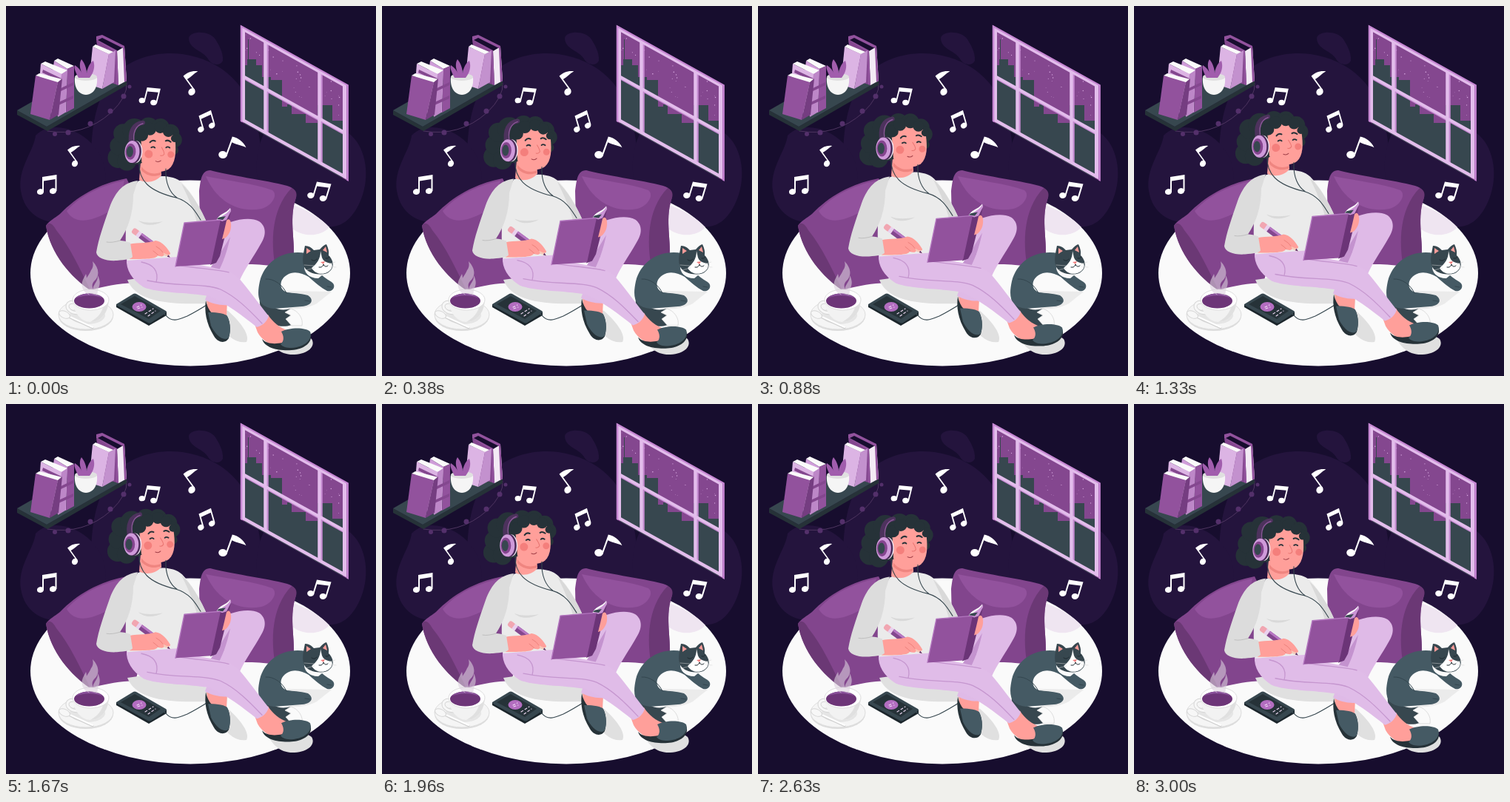
An HTML page that plays this animation: 500 px wide and 500 px high, repeating every 3040 ms.

```html
<!DOCTYPE html>
<html lang="en">
<head>
<meta charset="utf-8">
<title>Reading with music</title>
<style>
html, body { margin: 0; width: 100%; height: 100%; overflow: hidden; background: #170d2e; }
svg { display: block; width: 100vw; height: 100vh; }
.line { fill: none; stroke-linecap: round; stroke-linejoin: round; }
</style>
</head>
<body>
<svg viewBox="0 0 500 500">
<defs>
  <g id="pair" fill="#fff">
    <ellipse cx="-9" cy="9" rx="4.6" ry="4" transform="rotate(-15 -9 9)"/>
    <ellipse cx="8" cy="8" rx="4.6" ry="4" transform="rotate(-15 8 8)"/>
    <path d="M-6.500 9V-11L13-14V8H11V-8L-4.500-5.500V9Z"/>
  </g>
  <g id="single" fill="#fff">
    <ellipse rx="5.500" ry="4.800" transform="rotate(-15)"/>
    <path d="M3.500 0V-26C11-27 19-25 25-19C18-20 12-18 5.500-19V0Z"/>
  </g>
  <clipPath id="pane"><path d="M317 26L463 107V237L317 156Z"/></clipPath>
</defs>

<!-- backdrop -->
<rect width="500" height="500" fill="#170d2e"/>
<g fill="#24143d">
  <path d="M118 250C110 180 118 122 150 90C190 55 250 58 290 84C325 108 350 150 345 250Z"/>
  <path d="M20 250C15 220 38 195 40 175C60 155 95 165 115 185C135 205 140 235 130 262C110 300 30 310 20 250Z"/>
  <path d="M340 235C335 200 345 165 368 150C410 130 450 155 463 172C485 188 492 225 482 255C472 285 455 300 435 298C390 280 350 270 340 235Z"/>
  <path d="M247 43C250 33 275 33 283 45C287 52 294 62 293 74C289 82 277 80 272 70C265 60 247 58 247 43Z"/>
</g>

<!-- shelf -->
<path class="line" d="M56 169Q105 177 142 144Q165 122 163 104" stroke="#4e3560"/>
<g fill="#54306b">
  <circle cx="66" cy="173" r="3"/><circle cx="84" cy="171" r="3.500"/><circle cx="114" cy="159" r="3.500"/>
  <circle cx="141" cy="142" r="3.500"/><circle cx="159" cy="122" r="3.500"/><circle cx="167" cy="109" r="2.500"/>
</g>
<path d="M15 141L55 163L163 101V107L56 169L15 147Z" fill="#263238"/>
<path d="M15 141L123 79L163 101L55 163Z" fill="#37474f"/>
<path d="M122 46L150 61L152 107L130 100Z" fill="#84478f"/>
<path d="M150 61L160 55L163 101L152 107Z" fill="#f3eaf5"/>
<path d="M122 46V41L130 39L160 54L163 101L160 103L158 57L130 43L124 46L150 60L152 107L149 106L148 62Z" fill="#92529d"/>
<path d="M117 55L139 65L130 112L112 106Z" fill="#dcb4e4"/>
<path d="M139 65L148 60L146 103L130 112Z" fill="#c391ce"/>
<path d="M117 55L121 52L145 62L139 65Z" fill="#fafafa"/>
<path d="M93 97C92 108 96 119 108 120C120 119 124 108 123 97Z" fill="#f5f5f5"/>
<ellipse cx="108" cy="96" rx="15" ry="5" fill="#e0e0e0"/>
<path d="M98 97C95 91 91 84 93 80C98 83 101 87 103 92C99 84 99 76 102 72C106 77 109 84 109 91C110 83 114 76 118 74C121 82 118 91 113 97Z" fill="#a15dad"/>
<path d="M65 74L70 71L92 81L83 85Z" fill="#fafafa"/>
<path d="M65 74L83 85L81 144L58 132Z" fill="#cf9dd9"/>
<path d="M83 85L92 81V138L81 144Z" fill="#92529d"/>
<path d="M47 78L53 75L83 87L75 92Z" fill="#fafafa"/>
<path d="M47 78L75 92L72 149L42 138Z" fill="#dcb4e4"/>
<path d="M75 92L83 87L80 144L70 150Z" fill="#bd87c8"/>
<path d="M50 86L75 98V102L49 90ZM72 112L91 103V107L72 116ZM71 130L91 121V125L71 134Z" fill="#84478f"/>
<path d="M40 94L45 91L76 99L69 104Z" fill="#fafafa"/>
<path d="M40 94L70 103L59 154L33 146Z" fill="#92529d"/>
<path d="M70 103L76 98L71 147L59 154Z" fill="#753d81"/>

<!-- window -->
<g clip-path="url(#pane)">
  <rect x="317" y="26" width="146" height="211" fill="#84478f"/>
  <path d="M322 240V80H326V72H327V45H328V72H338V80H346V96H358V100H373V136H380V133H386V146H405V158H421V134H441V155H455V240Z" fill="#37474f"/>
  <g id="stars" fill="#d9aae2"/>
</g>
<g transform="translate(317 26) skewY(29)" fill="none">
  <path d="M36.500 5V125M109.500 5V125M5 69.500H141" stroke="#c68bd2" stroke-width="2.500"/>
  <path d="M33.500 4V126M106.500 4V126M4 67H142" stroke="#e3bdec" stroke-width="4.500"/>
  <rect x="3.500" y="3.500" width="137" height="123" stroke="#e3bdec" stroke-width="5"/>
  <path d="M1 130V1H144.500V130" stroke="#c687d3" stroke-width="2.500"/>
</g>

<!-- notes -->
<use href="#pair" transform="translate(194 121.500) rotate(14) scale(.93)"/>
<use href="#pair" transform="translate(269 156.500) rotate(-16) scale(.92)"/>
<use href="#pair" transform="translate(55.500 242)"/>
<use href="#pair" transform="translate(423 250) rotate(17)"/>
<use href="#single" transform="translate(293 201) rotate(20) scale(1.05)"/>
<use href="#single" transform="translate(251 116) rotate(-36) scale(.92)"/>
<use href="#single" transform="translate(93 213) rotate(-36) scale(.8)"/>

<!-- round mat and cushions -->
<ellipse cx="249" cy="361" rx="216" ry="125.500" fill="#fafafa"/>
<path d="M385 268L386 300C402 314 427 311 437 299C424 285 405 275 385 268Z" fill="#efe5f1"/>
<path d="M54 297C58 290 66 287 73 281C95 258 125 240 163 233L195 300L175 374C150 375 132 379 114 384C88 366 60 335 54 297Z" fill="#82458d"/>
<path d="M82 277C100 256 130 242 160 236L152 270C125 288 95 300 82 277Z" fill="#92529d"/>
<path d="M54 297C57 291 63 293 68 303C88 328 98 352 114 384C88 367 60 335 54 297Z" fill="#6b3875"/>
<path d="M261 250C263 238 263 222 276 222C300 229 350 235 380 243C390 246 394 252 391 262C382 290 392 320 388 345C385 354 375 354 365 352C340 348 325 349 300 349L262 290Z" fill="#82458d"/>
<path d="M270 230C300 236 335 240 360 249C368 255 360 270 345 274C315 280 285 265 270 230Z" fill="#92529d"/>
<path d="M386 246C393 249 394 255 391 262C382 290 392 320 388 345C385 354 375 354 364 352C358 320 358 275 386 246Z" fill="#6b3875"/>

<!-- floor shadows -->
<g fill="#e0e0e0">
  <path d="M164 370C175 398 215 404 270 402L300 412C318 428 330 445 325 454C312 456 302 448 294 438L300 390L200 365Z"/>
  <path d="M350 440C358 460 370 472 390 471C408 470 419 460 413 450C400 440 375 440 350 440Z"/>
  <path d="M365 405C385 412 405 410 420 402L440 386L380 385Z" fill="#ebebeb"/>
</g>

<!-- coffee -->
<ellipse cx="108" cy="419" rx="37" ry="20" fill="#dcdcdc"/>
<ellipse cx="108" cy="417" rx="37" ry="20" fill="#f5f5f5" stroke="#dedede"/>
<ellipse cx="110" cy="418" rx="24" ry="12" fill="#e5e5e5"/>
<path class="line" d="M93 401C80 397 78 414 97 415" stroke="#d5d5d5" stroke-width="5"/>
<path class="line" d="M93 401C80 397 78 414 97 415" stroke="#f7f7f7" stroke-width="3"/>
<path d="M90 397C91 415 102 427 114 427C128 427 138 415 139 397Z" fill="#f2f2f2"/>
<path d="M139 397C138 415 128 427 114 427C126 420 131 412 132 402Z" fill="#e0e0e0"/>
<ellipse cx="114.500" cy="397" rx="24.500" ry="14" fill="#fff" stroke="#dedede"/>
<ellipse cx="112.500" cy="398.500" rx="20.500" ry="10" fill="#6d3578"/>
<path d="M94 395C103 386 122 386 131 395C121 390 104 390 94 395Z" fill="#89509a"/>
<path class="line" d="M82 419L117 435" stroke="#d0d0d0" stroke-width="3"/>
<path class="line" d="M82 418L117 434" stroke="#fff" stroke-width="2"/>
<ellipse cx="79" cy="417" rx="8" ry="4.500" transform="rotate(25 79 417)" fill="#f7f7f7" stroke="#d5d5d5"/>
<g fill="#ddd2df" opacity=".58">
  <path d="M111 388C98 376 112 366 115 357C118 353 118 349 117 345C126 354 127 365 119 372C114 378 118 382 120 390Z"/>
  <path d="M107 387C98 376 105 369 108 362C111 371 105 377 113 391Z"/>
  <path d="M119 390C113 378 125 374 124 364C131 378 122 381 124 391Z"/>
</g>

<!-- phone -->
<path d="M149 403V407L193 432L217 418V413Z" fill="#1b252b"/>
<path d="M149 403L172 389Q174 388 176 389L216 412Q218 414 216 415L196 428Q194 429 192 428L150 405Z" fill="#37474f"/>
<path d="M155 403L174 392L209 412L193 423Z" fill="#263238"/>
<ellipse cx="180" cy="406.500" rx="9.500" ry="6.500" fill="#b36dc0"/>
<path class="line" d="M177 407L183 404M178 409L184 407M188 416L199 409M192 419L202 412" stroke="#f2dcf6" stroke-width="1.100" stroke-dasharray="3 3"/>
<path class="line" d="M211 414L216 418C224 428 233 424 245 419C257 413 265 408 276 401" stroke="#37474f" stroke-width="1.200"/>

<!-- cat -->
<path d="M343 392C340 420 362 439 386 431L378 423L385 418L377 414L385 409C370 413 358 408 352 398Z" fill="#37474f"/>
<path d="M385 409C395 412 402 422 400 432L386 432L378 423L385 418L377 414Z" fill="#fafafa" stroke="#d0d0d0" stroke-width=".7"/>
<path d="M405 334C375 329 350 345 343 372C338 395 342 407 362 409L400 406C413 405 417 397 408 391C396 388 388 388 380 387C367 383 369 366 385 361C394 359 402 362 409 366C418 374 426 381 434 385C442 387 447 378 440 373C432 368 426 364 422 359Z" fill="#455a64"/>
<path class="line" d="M351 369C362 368 374 377 379 388M404 398L411 399M434 379L440 380" stroke="#34464f"/>
<path d="M403 350C402 360 409 368 422 368L432 360Z" fill="#fafafa"/>
<path d="M404 324Q411 324 416 330L424 329Q429 323 433 322Q437 330 436 337C444 345 444 356 434 361C422 365 405 361 402 350C400 342 402 334 404 324Z" fill="#37474f"/>
<path d="M406 327L412 331L406 335ZM432 325L434 333L428 330Z" fill="#f59b98"/>
<path d="M425 331C425 342 420 348 413 354C418 363 428 363 434 360C440 357 442 351 440 348C433 347 429 345 427 340Z" fill="#fff"/>
<path d="M425 346L431 345L429 349Z" fill="#f08080"/>
<path class="line" d="M413 343Q417 346 420 342M432 341Q435 342 437 339M423 353Q428 354 429 349Q431 354 435 351" stroke="#1f2a30"/>
<path class="line" d="M416 351L403 350M417 354L405 357M436 349L445 346M437 352L446 353" stroke="#d5d5d5" stroke-width=".5"/>

<!-- reader -->
<g id="reader">
  <path d="M271 394L299 397L298 421C288 425 278 421 272 412Z" fill="#ff9f9a"/>
  <path d="M270 398C268 412 270 428 281 446C287 456 297 456 301 449C304 437 303 425 298 418C288 424 274 418 270 398Z" fill="#263238"/>
  <path d="M273 414C281 414 293 414 299 419C304 430 304 443 300 449C292 453 282 443 277 432Z" fill="#455a64"/>
  <path d="M336 430L354 417C360 427 370 435 382 439L378 460C360 462 346 452 340 441Z" fill="#ff9f9a"/>
  <path d="M346 450C352 457 364 457 373 455L411 442C416 454 403 464 386 465C369 466 350 463 346 450Z" fill="#263238"/>
  <path d="M372 440C383 434 405 434 411 440C415 451 403 461 386 462C379 462 374 461 371 457C377 452 375 445 372 440Z" fill="#455a64"/>

  <path d="M280 302C300 291 327 283 342 291C352 298 352 310 344 322C335 338 325 352 318 366L300 404C290 405 277 402 269 397C275 380 285 360 295 340L240 350Z" fill="#dfbae7"/>
  <path d="M303 312C300 326 296 341 288 357L276 354L292 330Z" fill="#c493cf"/>
  <path d="M163 342C162 356 170 370 186 380C205 388 245 387 275 392C300 403 320 419 339 434C347 432 353 426 355 419C340 400 327 382 314 367C300 354 270 353 240 345L238 330L170 330Z" fill="#e0bce8"/>
  <path class="line" d="M183 346C199 349 207 358 203 373M191 371C235 380 266 374 290 383C311 393 328 410 346 429M237 351C264 355 285 356 301 360" stroke="#c596cf" stroke-width="1.300"/>

  <path d="M178 237C195 229 225 226 238 239C252 253 264 276 272 294L232 339C208 341 185 342 164 344C160 320 162 290 165 260Z" fill="#ebebeb"/>
  <path d="M179 290C187 298 202 297 212 291C202 293 189 294 179 290ZM237 240C245 256 255 278 258 293L272 294C264 275 251 252 237 240Z" fill="#d9d9d9"/>
  <path d="M182 210L180 235C189 240 203 238 210 229L209 212Z" fill="#ff9f9a"/>
  <path d="M183 217C191 227 200 228 209 225V228C199 232 189 229 183 222Z" fill="#ef8580"/>

  <!-- book -->
  <path d="M284 290C288 280 297 281 303 273L304 277L297 291Z" fill="#fafafa"/>
  <path d="M289 290L298 287L304 276L302 287L289 338L284 347L276 350Z" fill="#6b3477"/>
  <path d="M241 293L290 289L277 349L229 352Z" fill="#92529d"/>
  <path d="M288 289C291 282 299 282 303 274L304 277L298 289L292 291Z" fill="#c993d4"/>
  <path d="M285 288C288 284 294 285 297 284L293 289Z" fill="#37474f"/>
  <path class="line" d="M241 293L229 352M241 293L289 289" stroke="#b376bf" stroke-width="1.400"/>
  <path d="M298 290C303 284 306 295 303 304C300 311 297 314 292 315L295 303Z" fill="#ff9f9a"/>

  <!-- writing arm -->
  <g transform="translate(172 303) rotate(36.500)">
    <rect x="-1" y="-4" width="10" height="8" rx="3" fill="#f1a6b1"/>
    <rect x="7" y="-4" width="5" height="8" fill="#ead1ee"/>
    <rect x="12" y="-4" width="38" height="8" fill="#84478f"/>
    <rect x="12" y="-4" width="38" height="3" fill="#b777c3"/>
    <path d="M50-4L62 0L50 4Z" fill="#f5cbb9"/>
    <path d="M58-1.500L62 0L58 1.500Z" fill="#5d2c68"/>
  </g>
  <path d="M166 322C180 319 193 321 202 317C211 318 218 327 222 334C222 338 217 336 212 333C216 338 211 340 205 337C204 342 188 342 167 342Z" fill="#ff9f9a"/>
  <path class="line" d="M203 325Q209 328 212 333M199 331Q203 334 206 337" stroke="#e87974" stroke-width=".8"/>
  <path d="M178 236C160 238 148 250 140 272C132 295 125 315 122 333C123 341 136 345 150 344C162 343 169 342 171 339L168 320C163 318 158 317 154 317C165 301 172 280 172 255Z" fill="#dcdcdc"/>
  <path class="line" d="M154 317C147 319 141 320 136 319" stroke="#bfbfbf"/>

  <g id="head">
    <g fill="#263238">
      <circle cx="151" cy="207" r="14"/><circle cx="152" cy="191" r="13"/><circle cx="163" cy="211" r="13"/>
      <circle cx="156" cy="174" r="13"/><circle cx="171" cy="169" r="16"/><circle cx="190" cy="164" r="13.500"/>
      <circle cx="206" cy="163" r="12"/><circle cx="220" cy="170" r="12"/><circle cx="225" cy="179" r="11"/>
      <circle cx="226" cy="193" r="6"/><circle cx="174" cy="197" r="18"/>
    </g>
    <path d="M181 183C184 160 222 160 227 180C229 196 229 211 220 219C210 226 192 225 183 211Z" fill="#ff9f9a"/>
    <g fill="#263238">
      <circle cx="182" cy="175" r="8"/><circle cx="192" cy="166" r="8.500"/><circle cx="206" cy="163" r="8"/>
      <circle cx="217" cy="168" r="7.500"/><circle cx="226" cy="177" r="5"/>
    </g>
    <circle cx="192" cy="200" r="5.500" fill="#f47f7c"/>
    <circle cx="222" cy="199" r="4.500" fill="#f47f7c"/>
    <path class="line" d="M193 184Q196 180 200 182M214 181Q217 179 221 182" stroke="#263238" stroke-width="2"/>
    <path class="line" d="M195 191Q198 189 200 191M215 190Q217 188 220 190" stroke="#263238" stroke-width="1.800"/>
    <path class="line" d="M209 190Q213 196 213 199Q211 202 208 201" stroke="#e87571"/>
    <path class="line" d="M202 209Q206 211 209 208" stroke="#9f3e47"/>
    <path class="line" d="M168 190C164 170 170 160 182 158" stroke="#4d325d" stroke-width="6"/>
    <path class="line" d="M172 188C168 172 173 162 182 159" stroke="#8a5797" stroke-width="1.500"/>
    <ellipse cx="174.500" cy="198" rx="9" ry="15" fill="#f1e6f3"/>
    <ellipse cx="172" cy="198" rx="10" ry="15.500" fill="#4b2b59"/>
    <ellipse cx="169.500" cy="198" rx="10" ry="15" fill="#cf9ada"/>
    <ellipse cx="167.500" cy="198" rx="7" ry="11" fill="#85458f"/>
    <ellipse cx="166.500" cy="198" rx="4.500" ry="7.500" fill="#37474f"/>
  </g>
  <path class="line" d="M180 212C179 235 192 250 230 259C250 265 257 280 263 289M216 220C215 240 222 253 231 259" stroke="#37474f" stroke-width="1.100"/>
</g>
</svg>
<script>
const byId = id => document.getElementById(id);

let seed = 11;
const rand = () => (seed = seed * 16807 % 2147483647) / 2147483647;
let dots = "";
for (let i = 0; i < 45; i++) {
  const x = 324 + rand() * 132, sky = 34 + (x - 317) * .555;
  const y = sky + rand() * 48, r = .3 + rand() * .5;
  const ground = x < 346 ? 70 : x < 373 ? 98 : x < 421 ? 132 : x < 441 ? 132 : 150;
  if (y < ground) dots += `<circle cx="${x}" cy="${y}" r="${r}"/>`;
}
byId("stars").innerHTML = dots;

const LOOP = 3040, LIFT = 9.7, TILT = 4;

function draw() {
  const t = performance.now() % LOOP / LOOP;
  const rise = 1 - Math.abs(2 * t - 1);
  const tilt = TILT * (1 - rise) ** 2;
  byId("reader").setAttribute("transform", `translate(0 ${-LIFT * rise})`);
  byId("head").setAttribute("transform", `rotate(${tilt - 1} 190 215)`);
  requestAnimationFrame(draw);
}
draw();
</script>
</body>
</html>
```
